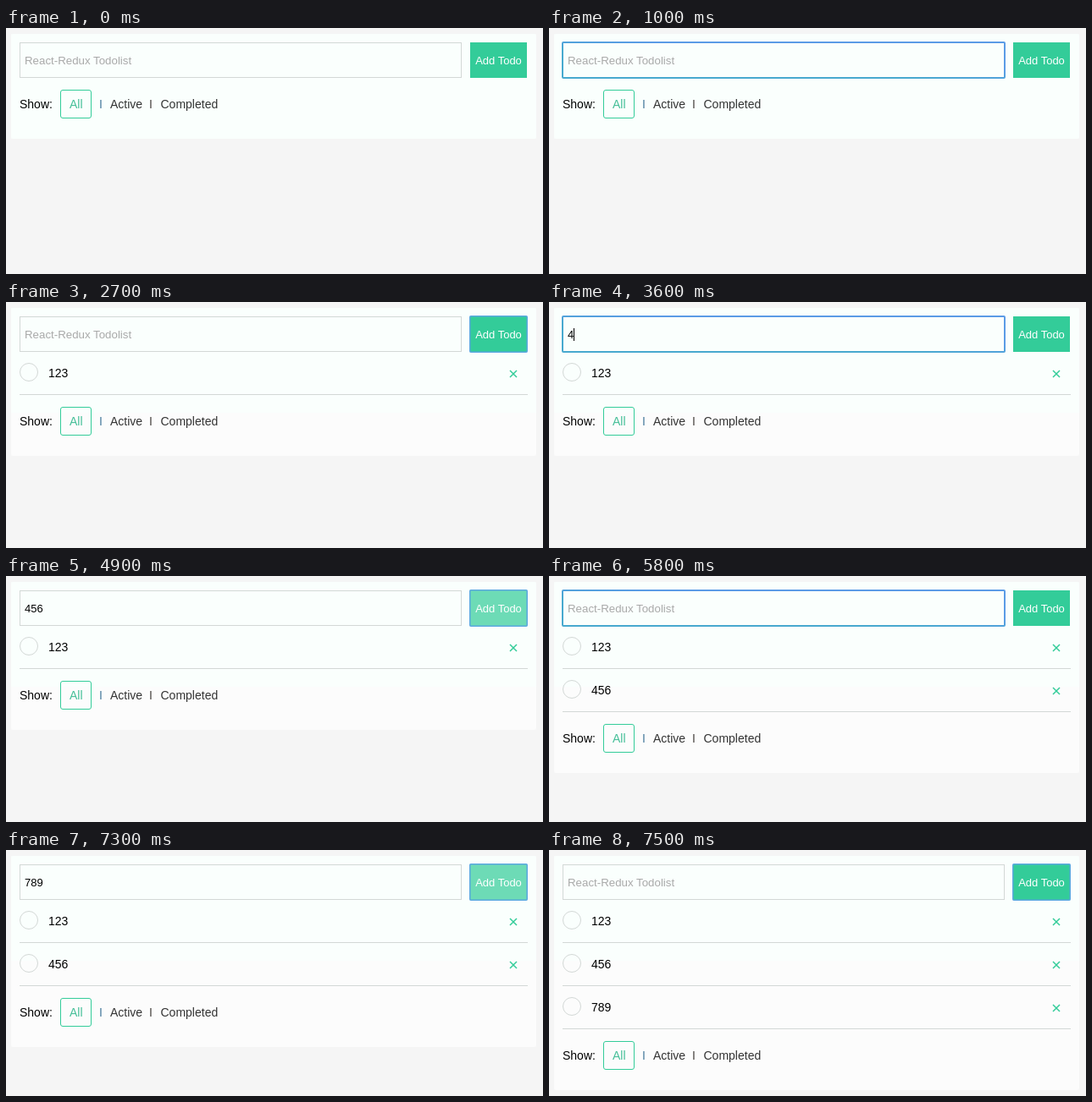
Recreate the animation shown at these times as an HTML page. Size 634 by 291 pixels, loop 8000 ms.

```html
<!DOCTYPE html>
<html lang="en">
<head>
<meta charset="utf-8">
<title>Todo list</title>
<style>
  html, body { margin: 0; width: 100%; height: 100%; overflow: hidden; background: #f5f5f5; }
  svg { display: block; width: 634px; height: 291px; font: 14px "Liberation Sans", Arial, sans-serif; }
  .field, .button { font-size: 13px; }
  .placeholder { font-size: 13.3px; fill: #a9a9a9; }
  .outline { fill: none; stroke: #d3d8d6; }
  .accent { fill: none; stroke: #33cc99; }
  .ring { fill: none; stroke-width: 2; }
  .link { fill: #333; }
</style>
</head>
<body>
<svg viewBox="0 0 634 291">
  <defs>
    <linearGradient id="ringColor" x1="0" y1="1" x2="1" y2="0">
      <stop offset=".4" stop-color="#48a9cf"/>
      <stop offset=".6" stop-color="#5b9be6"/>
    </linearGradient>
    <clipPath id="panelClip"><rect id="panel" x="6" y="7" width="620" height="124" rx="2"/></clipPath>
    <g id="item">
      <circle class="outline" cx="27" cy="83" r="10.5"/>
      <path class="accent" stroke-width="1.5" d="M595 81l8 8m0-8l-8 8"/>
      <path class="outline" d="M16 109.5H616"/>
    </g>
  </defs>

  <g clip-path="url(#panelClip)">
    <rect x="6" y="7" width="620" height="277" fill="#fcfcfc"/>
    <rect x="6" y="7" width="620" height="124" fill="#fafffd"/>
  </g>

  <g class="field">
    <rect class="outline" x="16.5" y="17.5" width="521" height="41"/>
    <rect id="fieldRing" class="ring" x="16" y="17" width="522" height="42" rx="1" stroke="url(#ringColor)"/>
    <text id="placeholder" class="placeholder" x="22" y="43">React-Redux Todolist</text>
    <text id="typed" x="22" y="43"></text>
    <rect id="caret" y="31" width="1" height="15"/>
  </g>

  <g class="button">
    <rect id="buttonFace" x="548" y="17" width="67" height="42" fill="#33cc99"/>
    <text x="581.5" y="43" text-anchor="middle" fill="#fff">Add Todo</text>
    <rect id="buttonRing" class="ring" x="547.75" y="16.75" width="67.5" height="42.5" rx="1" stroke="#5ba8e0" style="stroke-width:1.5"/>
  </g>

  <g id="items"></g>

  <g id="filters">
    <text x="16" y="95">Show:</text>
    <rect class="accent" x="64.5" y="73.5" width="36" height="33" rx="2.5"/>
    <text x="75" y="95" fill="#45bf98">All</text>
    <text x="110" y="95" fill="#477a9c">I</text>
    <text class="link" x="123" y="95">Active</text>
    <text x="169" y="95" fill="#494440">I</text>
    <text class="link" x="182.5" y="95">Completed</text>
  </g>
</svg>
<script>
  const LOOP = 8000, ROW = 51, DIGIT = 7;
  const todos = ["123", "456", "789"];
  const el = id => document.getElementById(id);
  const show = (id, on) => el(id).setAttribute("visibility", on ? "visible" : "hidden");

  // Per todo: focus, caret off, three keys, caret off, hover, press, add, leave
  const rounds = [
    [500, 1000, 1300, 1400, 1600, 2100, 2300, 2500, 2600, 2700],
    [3000, 3500, 3600, 3800, 4000, 4500, 4800, 4900, 5000, 5000],
    [5300, 5800, 6000, 6200, 6400, 6900, 7100, 7300, 7400, 7500]
  ];

  el("items").innerHTML = todos.map((name, i) =>
    `<g id="todo${i}" transform="translate(0 ${i * ROW})"><use href="#item"/><text x="50" y="89">${name}</text></g>`
  ).join("");

  function stateAt(t) {
    const state = { focus: "", caret: false, text: "", hover: false, count: 0 };
    rounds.forEach(([focus, blink, k1, k2, k3, rest, hover, press, add, leave], i) => {
      if (t < focus) return;
      const keys = [k1, k2, k3].filter(k => t >= k).length;
      state.focus = t < press ? "field" : "button";
      state.caret = t < blink || (t >= k1 && t < rest);
      state.text = t < add ? todos[i].slice(0, keys) : "";
      state.hover = t >= hover && t < leave;
      state.count = t < add ? i : i + 1;
    });
    return state;
  }

  function draw() {
    const { focus, caret, text, hover, count } = stateAt(performance.now() % LOOP);
    show("fieldRing", focus === "field");
    show("buttonRing", focus === "button");
    show("placeholder", !text);
    show("caret", caret);
    el("caret").setAttribute("x", 22 + DIGIT * text.length);
    el("typed").textContent = text;
    el("buttonFace").setAttribute("opacity", hover ? 0.7 : 1);
    todos.forEach((_, i) => show("todo" + i, i < count));
    el("panel").setAttribute("height", 124 + ROW * count);
    el("filters").setAttribute("transform", `translate(0 ${ROW * count})`);
    requestAnimationFrame(draw);
  }
  draw();
</script>
</body>
</html>
```
